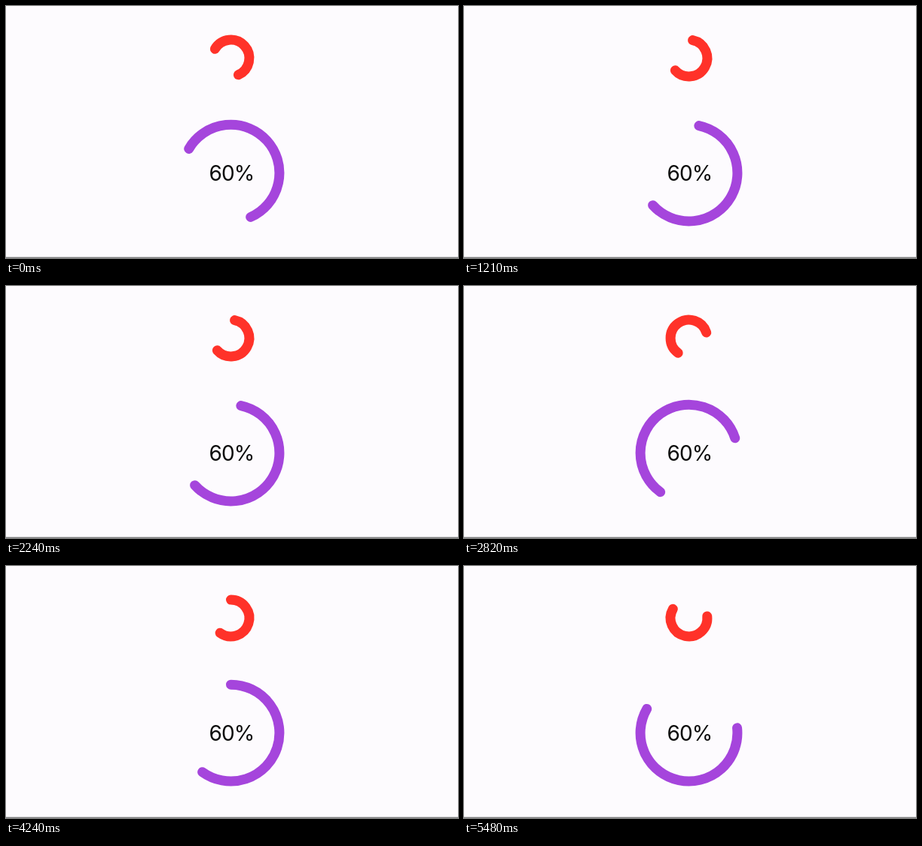
Write an HTML page that moves like this. It is 600x336 px and loops after 5510 ms.

```html
<!DOCTYPE html>
<html lang="en">
<head>
<meta charset="utf-8">
<title>Progress rings</title>
<style>
  html, body { margin: 0; width: 100%; height: 100%; overflow: hidden; background: #fdfbfe; }
  svg { display: block; width: 600px; height: 336px; }
  .ring { fill: none; stroke-width: 13; stroke-linecap: round; }
  text { font: 400 28px Inter, "Liberation Sans", sans-serif; letter-spacing: -0.9px; fill: #0c0c0c; text-anchor: middle; }
</style>
</head>
<body>
<svg viewBox="0 0 600 336">
  <path class="ring" id="small" stroke="#ff3229"/>
  <path class="ring" id="large" stroke="#a545dc"/>
  <text x="299.4" y="233">60%</text>
  <rect y="334.7" width="600" height="1.3" fill="#7f7f80"/>
</svg>
<script>
  const LOOP = 5510;          // ms
  const FPS = 33;
  const SWEEP = 0.6 * 360;    // degrees
  const START = 210;
  const TICK = 6;             // rotation advances in whole ticks
  const SPEED = 10.733;       // degrees per step

  const rings = [
    { el: document.getElementById("small"), x: 298.5, y: 69.5, r: 24.4 },
    { el: document.getElementById("large"), x: 298.5, y: 222.6, r: 64.4 }
  ];

  function point({ x, y, r }, deg) {
    const a = deg * Math.PI / 180;
    return `${(x + r * Math.cos(a)).toFixed(3)} ${(y + r * Math.sin(a)).toFixed(3)}`;
  }

  function arc(ring) {
    return `M${point(ring, 0)}A${ring.r} ${ring.r} 0 1 1 ${point(ring, SWEEP)}`;
  }

  // Steps fall on centisecond boundaries.
  function angleAt(ms) {
    const step = Math.floor((Math.floor(ms / 10) + 0.5) * FPS / 100);
    return START + Math.round(step * SPEED / TICK) * TICK;
  }

  function draw() {
    const angle = angleAt(performance.now() % LOOP);
    for (const { el, x, y } of rings) {
      el.setAttribute("transform", `rotate(${angle % 360} ${x} ${y})`);
    }
    requestAnimationFrame(draw);
  }

  for (const ring of rings) ring.el.setAttribute("d", arc(ring));
  draw();
</script>
</body>
</html>
```
